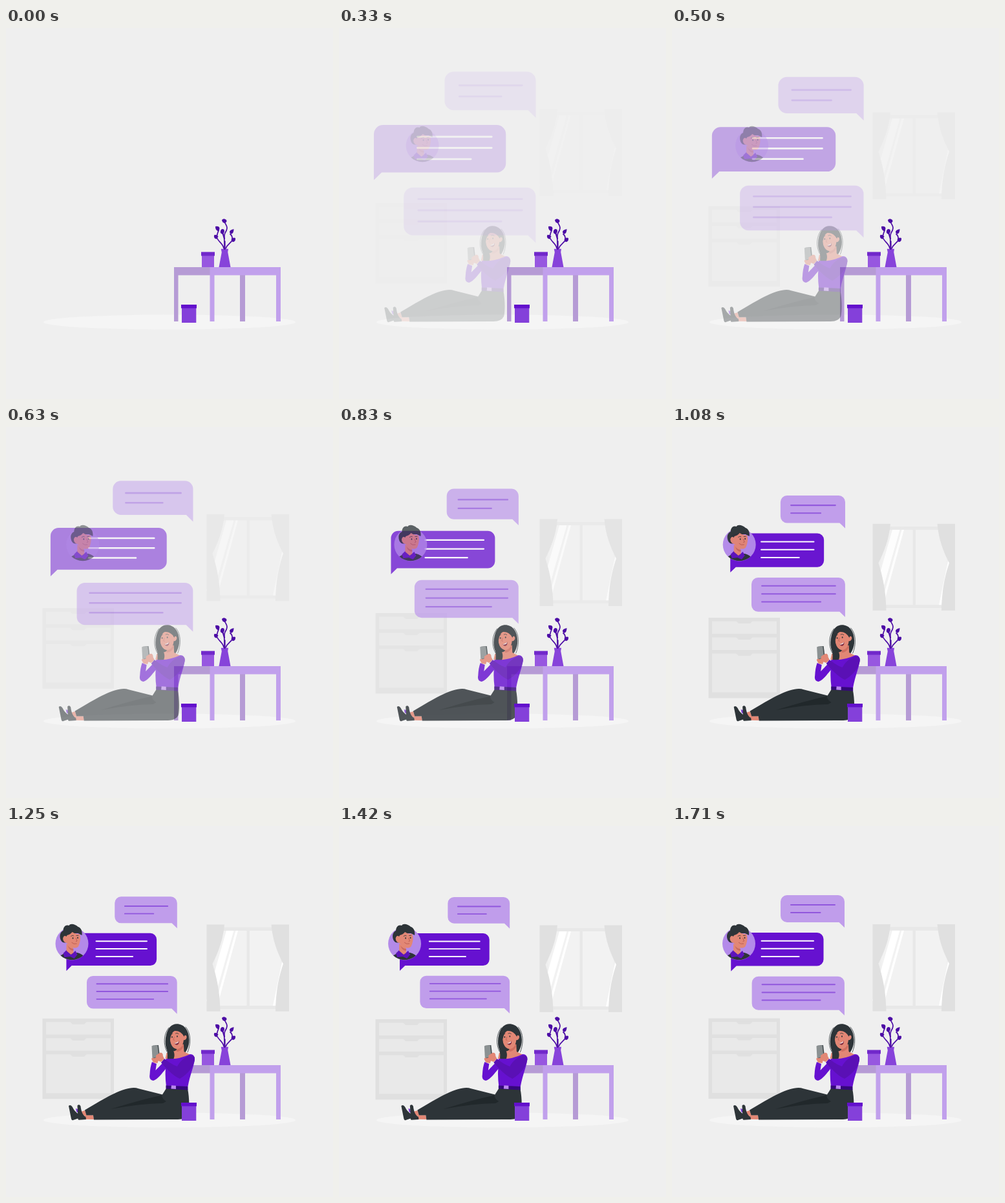
An HTML page for the animation above (1790 ms loop, 506 px wide and 574 px high).

```html
<!DOCTYPE html>
<html lang="en">
<head>
<meta charset="utf-8">
<title>Chat at home</title>
<style>
html, body { margin: 0; width: 100%; height: 100%; overflow: hidden; background: #efefef; }
svg { display: block; width: 100vw; height: 100vh; }
.ink { fill: #2d3438; }
.skin { fill: #e28775; }
.top { fill: #6611d0; }
.pale { fill: #c09deb; }
.frame { fill: #e0e0e0; }
.line { fill: none; stroke-width: 2; stroke-linecap: round; }
.thin { fill: none; stroke: #2d3438; stroke-width: .8; stroke-linecap: round; }
</style>
</head>
<body>
<svg viewBox="0 0 506 574" xmlns="http://www.w3.org/2000/svg">
  <defs><clipPath id="disc"><circle cx="103.5" cy="182" r="25.3"/></clipPath></defs>
  <rect width="506" height="574" fill="#efefef"/>

  <g id="room">
    <rect x="331" y="156" width="86" height="126" fill="#e8e8e8"/>
    <rect x="324" y="161" width="101" height="116.5" fill="#f2f2f2"/>
    <path fill="#fff" d="M341 161h11.500l-31 109h-11.500zM355.500 161h3.500l-32 116.500h-3.500zM427 210h3l-13 67.500h-4z"/>
    <path fill="#e8e8e8" d="M330 156h88v5h-88zM372.500 161h4.500v117h-4.500zM330 277.500h88v4.500h-88z"/>
    <path class="frame" d="M310.500 151.600H338C336 176 328 195 319.500 212.500C326 233 331 255 331.500 286H310.500z"/>
    <path class="frame" d="M438 151.600H410.500C412.500 176 420 195 429 212.500C422 233 417.500 255 417 286H438z"/>
    <rect class="frame" x="56.500" y="297" width="110.500" height="124.500"/>
    <path fill="#e9e9e9" d="M62 302.500h100v19.500H62zM62 327.500h100v19.500H62zM62 352.500h100v60H62z"/>
    <path id="pulls" class="frame"/>
  </g>

  <ellipse cx="253" cy="455" rx="195" ry="11.500" fill="#f5f5f5"/>

  <path fill="#b69bd5" d="M260 370h56v12.500h-49.500V454H260zM362 382h8v72h-8z"/>
  <path fill="#c1a0ec" d="M315.500 370H425v84h-7v-71.500h-95.500V454h-7z"/>
  <path fill="#9757e0" d="M303 351h19v19h-19z"/>
  <path fill="#7128cb" d="M302 346.500h21v6h-21z"/>
  <path fill="#8743da" d="M332.700 341.800h11.300l-.8 5 4.300 23.200h-18l4.300-23z"/>
  <g fill="none" stroke="#4c0ba5" stroke-width="1.700" stroke-linecap="round">
    <path d="M338 342C339 331 336 324 339 317C344 309 342 307 338 300"/>
    <path d="M337 341C336 333 327 330 326 323Q327 318 329 313"/>
    <path d="M340 341C343 334 349 332 350 328Q351 322 347 319"/>
    <path d="M338 326L335 316M338.500 342V330" stroke-width="2.200"/>
  </g>
  <g fill="#4c0ba5">
    <path d="M334 297q3-3.500 7 0q1.500 3-2 4.500q-4 1-5-4.500z"/>
    <path d="M324 307q6-1 6.500 3l-1 4.500q-6-1-5.500-7.500z"/>
    <path d="M332 313.500q2-4 5.500-1.500q1.500 4-2.500 7q-4-1-3-5.500z"/>
    <path d="M352.500 311q-7 1.500-6.500 5l1.500 3q5-.5 5-8z"/>
    <path d="M322 320.500q3.500-1.500 6.500 2l-2.500 4q-5-.5-4-6z"/>
    <path d="M355 325q-4-1.500-6.500 2l2 4q5 0 4.500-6z"/>
  </g>

  <g id="woman">
    <path class="skin" d="M111 443l9-3 3 8-10 2zM120 447l13 .5 1 6.500-13-.3z"/>
    <path fill="#7c3bd6" d="M106 437l3 1 1 6-3-2z"/>
    <path class="ink" d="M95 433q3-3 6 2c3 6 7 10 13 12l1 4-7 2-6 2q-2 1-3-2z"/>
    <path class="ink" d="M108.500 432.500q3-3 5 1c1 8 3 14 8 16.500l.5 4-11 .7q-2 0-1.500-3z"/>
    <path class="ink" d="M246 406H279C282 420 282 438 280 446Q276 454 264 454L134 454.500L133 447.500L122.500 447.500L120 439.500C145 425 170 409 189 405.800Q197 404 203 406.200L240 415.500z"/>
    <path fill="#21282b" d="M160 438Q205 424 239 416.500Q240 423 246 426L241 429Q205 429.500 160 438z"/>

    <path class="ink" d="M262 306.200C273 306 281 315 281.500 330C282 340 277 350 273 353L251 352C245 347 243 334 246 323C249 311 255 306.500 262 306.200z"/>
    <path class="thin" d="M250 312C242 322 241 337 247 349M276 311C285 321 284 338 279 350"/>
    <path class="skin" d="M263 338h10l.5 11 10 5-8 9-31-3 2-9 13-3 5-3z"/>
    <path fill="#cf6f61" d="M262 344q7-1 11-7l-1 6q-4 6-10 6z"/>
    <path class="skin" d="M252 318C255 314 265 314 271 317L273 325C276 322 279 325 277 329Q275 332 273 331C272 340 268 345 263 345C256 345 252 337 251.500 329z"/>
    <path class="ink" d="M249 328C249 316 258 310 270 314Q276 318 274 326Q268 316 259 317Q254 319 252 330C252 339 256 345 258 350C260 357 257 364 251 369Q247 366 248 354C247 344 246 334 249 328z"/>
    <g class="ink">
      <ellipse cx="255" cy="326.500" rx=".9" ry="1.300"/>
      <ellipse cx="263" cy="325.500" rx=".9" ry="1.300"/>
    </g>
    <path class="thin" d="M252.500 322.500l3-1M260.500 321q2.500-1.500 4.500 .5"/>
    <path fill="none" stroke="#bd5f55" stroke-width=".8" d="M258.500 326l-1.500 5 2 .5"/>
    <path fill="#802a3d" d="M258.500 336q4 .5 7-3.500q1 5-2.500 6.200q-3 .5-4.500-2.700z"/>
    <path fill="#fff" d="M259 336q3.500 0 6-3l-.3 2q-2.500 2-5.200 1.800z"/>

    <path class="top" d="M246 360Q264 362 283 353Q290 353 290 361C289 372 283 384 279.500 403H246Q244 387 245 376C239 383 234 391 226 394Q219 393 220.500 385Q221 373 224 365L231 368 229.500 378L245 362z"/>
    <path fill="#5a10b5" d="M283 355Q291 354 290 362C288 373 280 383 267 391Q255 386 238 366L243 360Q254 369 263 372C268 363 275 357 283 355z"/>
    <path fill="#35087a" d="M245.500 401.500L279.500 403V408.500L245.500 406.500z"/>
    <path fill="#b885ed" d="M254 401.300l7 .4v5.300l-7.500-.5z"/>

    <path class="skin" d="M224 359l6-2 4 5-1.500 5-6-1q-3-3-2.500-7z"/>
    <path fill="#454d50" d="M225 339.800l9-.8 2 17-9.500 3.500z"/>
    <path fill="#8b9192" d="M223.500 340.200l9-.8 2 17.500-10 2z"/>
    <path class="skin" d="M230 355l6-4q5-1 5 5l2 4-5 5-5-2q-3-3-3-8z"/>
    <path class="skin" d="M223.500 359l6 1.500-1 2-5-.5z"/>
    <path fill="#efefef" d="M234 365l4 1-3.500 7z"/>
  </g>

  <path fill="#8440da" d="M272 433h22.300v23H272z"/>
  <path fill="#6310cc" d="M271 428h24v5.500h-24z"/>

  <g id="chat"></g>

  <g id="avatar">
    <circle cx="103.500" cy="182" r="25.500" fill="#b38ae9"/>
    <g clip-path="url(#disc)">
      <path class="ink" d="M78 208Q86 198 96 196L112 196Q120 198 124 204V210H78z"/>
      <path fill="#5d13bb" d="M90 197L96 191L102 199L109 193L112 199L107 205L101 202L92 203z"/>
    </g>
    <path class="skin" d="M95 182l10 5 1 9-4 3-7-6z"/>
    <path fill="#c96a5f" d="M97 185q4 5 9 5l-.3 3q-6 0-8.700-8z"/>
    <path class="ink" d="M86 176C83 168 87 163 90 162C90 155 95 152 99 154C101 150 109 152 113 156C117 157 120 162 119 169L113 166L103 166L95 180Q89 182 86 176z"/>
    <path class="skin" d="M96 169Q101 168 104 164Q109 168 115 167C118 172 116 182 113 187Q108 191 100 186L95.500 181Q90 180 89.500 174Q91 168 95 171z"/>
    <g class="ink"><ellipse cx="105" cy="173.500" rx=".9" ry="1.300"/><ellipse cx="112.500" cy="173" rx=".9" ry="1.300"/></g>
    <path class="thin" d="M102 170.500q2-2 4-.8M110.500 169.500l3-.2"/>
    <path fill="none" stroke="#b2544c" stroke-width=".8" d="M109.500 173l2 5-2 .6M103 180q3 3.500 8 2"/>
  </g>
</svg>
<script>
const LOOP = 1790, HIDDEN = 170, STEP = 1000 / 24, LAST = 41;
const el = id => document.getElementById(id);

// Rounded bubble with a tail below one bottom corner.
function bubble(x, y, w, h, left, fill, ink, lines) {
  const r = 10, side = left ? -1 : 1, c = x + w / 2, a = w / 2;
  const X = d => c + side * d, sweep = left ? 0 : 1;
  const arc = (d, py) => `A${r} ${r} 0 0 ${sweep} ${X(d)} ${py}`;
  const shape = `M${X(r - a)} ${y}H${X(a - r)}${arc(a, y + r)}V${y + h + 8.3}L${X(a - 8.5)} ${y + h}` +
    `H${X(r - a)}${arc(-a, y + h - r)}V${y + r}${arc(r - a, y)}z`;
  const rows = lines.map(([x1, x2, ly]) => `M${x1} ${ly}H${x2}`).join('');
  return `<path d="${shape}" fill="${fill}"/><path class="line" stroke="${ink}" d="${rows}"/>`;
}

el('chat').innerHTML =
  bubble(168, 107, 99, 42, false, '#c09deb', '#9156dd', [[184, 252, 122], [184, 229.5, 134]]) +
  bubble(91.2, 165, 143.3, 51.5, true, '#6611d0', '#fff', [[138.5, 219, 177.7], [138.5, 219, 189.8], [138.5, 196.5, 202]]) +
  bubble(123.6, 232.7, 143.3, 52, false, '#c09deb', '#9156dd', [[139.5, 252, 245.3], [139.5, 252, 257.5], [139.5, 229.5, 269.6]]);

el('pulls').setAttribute('d', [302, 327, 352].map(y => `M99 ${y}h26l-4 4h-18z`).join(''));

const curve = (s, a, b) => 3 * (1 - s) * (1 - s) * s * a + 3 * (1 - s) * s * s * b + s * s * s;

// Cubic bezier with a soft overshoot, solved by bisection.
function ease(x) {
  if (x >= 1) return 1;
  let lo = 0, hi = 1;
  for (let i = 0; i < 24; i++) {
    const m = (lo + hi) / 2;
    if (curve(m, .36, .5) < x) lo = m; else hi = m;
  }
  return curve(lo, -.01, 1.38);
}

const parts = [
  ['room', 1750, q => `translate(0 ${-30 * q})`],
  ['woman', 1530, q => `translate(${-30 * q} 0)`],
  ['chat', 1650, q => `translate(178.7 200) scale(${1 + q / 2}) translate(-178.7 -200)`],
  ['avatar', 1650, q => `translate(${30 * q} 0)`]
].map(([id, span, move]) => ({ node: el(id), span, move }));

function draw(t) {
  const time = Math.min(LAST, Math.floor((t + 4) / STEP)) * STEP;
  for (const { node, span, move } of parts) {
    const p = ease(time / span);
    node.setAttribute('transform', move(1 - p));
    node.setAttribute('opacity', t < HIDDEN ? 0 : Math.max(0, Math.min(1, p)));
  }
}

const start = performance.now();
function tick() {
  draw((performance.now() - start) % LOOP);
  requestAnimationFrame(tick);
}
draw(0);
requestAnimationFrame(tick);
</script>
</body>
</html>
```
